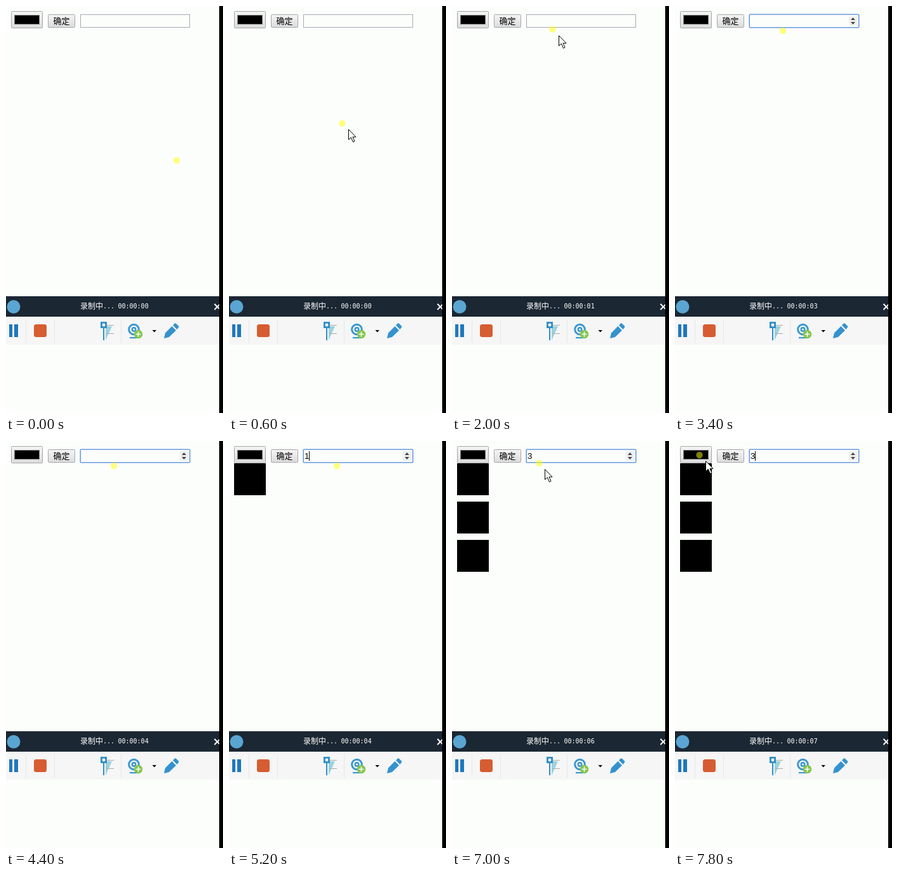
An HTML page for the animation above (8000 ms loop, 342 by 638 pixels).

```html
<!DOCTYPE html>
<html lang="zh">
<head>
<meta charset="utf-8">
<style>
  html, body { margin: 0; width: 100%; height: 100%; overflow: hidden; background: #fcfefc; }
  svg { display: block; position: absolute; left: 0; top: 0; }
  .label { font-family: "Noto Sans CJK SC", "Noto Sans CJK", sans-serif; }
  .mono { font: 10px "DejaVu Sans Mono", monospace; }
  .value { font: 13.33px "Liberation Sans", Arial, sans-serif; }
</style>
</head>
<body>
<svg width="342" height="638" viewBox="0 0 342 638">
  <defs>
    <linearGradient id="face" x2="0" y2="1">
      <stop offset="0" stop-color="#f5f5f5"/>
      <stop offset="1" stop-color="#dcdcdc"/>
    </linearGradient>
  </defs>
  <rect width="342" height="638" fill="#fcfefc"/>

  <!-- form -->
  <g stroke="#a6a6aa" fill="url(#face)">
    <rect x="8.5" y="8.5" width="49" height="26" rx="1"/>
    <rect x="66.5" y="13.5" width="42" height="20" rx="1"/>
  </g>
  <rect x="13.5" y="14.5" width="39" height="14" stroke="#777"/>
  <text class="label" x="74.5" y="28" font-size="13">确定</text>
  <rect x="117.5" y="13.5" width="172" height="20" fill="#fcfefc" stroke="#a9a9b0"/>
  <g id="focus">
    <rect x="117.25" y="13.25" width="172.5" height="20.5" rx="1" fill="#fcfefc" stroke="#6a9be0" stroke-width="1.6"/>
    <rect x="274" y="16" width="14" height="15" fill="#f0f0f0"/>
    <path d="M277 22L280.5 18L284 22ZM277 25H284L280.5 29Z" fill="#444"/>
  </g>
  <text id="value" class="value" x="119" y="28"></text>
  <rect id="caret" y="16" width="1" height="15"/>
  <g id="blocks">
    <rect x="8" y="35" width="50" height="50"/>
    <rect x="8" y="95" width="50" height="50"/>
    <rect x="8" y="155" width="50" height="50"/>
  </g>

  <!-- recorder bar -->
  <rect y="455" width="336" height="32" fill="#1b2733"/>
  <circle cx="12" cy="471.5" r="10.5" fill="#5aa5d2"/>
  <g fill="#fff">
    <text class="label" x="117" y="474.5" font-size="12">录制中</text>
    <text class="mono" x="153" y="474">...</text>
    <text id="clock" class="mono" x="176.5" y="474"></text>
  </g>
  <path d="M328.5 467L337.5 476M337.5 467L328.5 476" stroke="#fff" stroke-width="2"/>

  <!-- tools -->
  <rect y="487" width="336" height="44" fill="#f5f6f5"/>
  <path d="M31.5 492V528M76.5 492V528M181.5 492V528" stroke="#e6e8e8"/>
  <path d="M5 499H10V519H5ZM13 499H19V519H13Z" fill="#2077bd"/>
  <rect x="44" y="499" width="20" height="20" rx="3.5" fill="#d65c32"/>
  <g>
    <path d="M157 502H167L157 524Z" fill="#9cd2dc"/>
    <path d="M159 500.5H170M158 513.5H170" stroke="#a8acac"/>
    <path d="M149 495H159V505H155V524H153V505H149Z" fill="#338fc6"/>
    <circle cx="154" cy="500" r="2.4" fill="#fcfefc"/>
  </g>
  <g fill="none" stroke="#3c98d0">
    <circle cx="201.5" cy="507" r="7.8" stroke-width="3"/>
    <circle cx="201.5" cy="507" r="2.8" stroke-width="2.4"/>
    <path d="M195 520H208" stroke-width="2.2"/>
  </g>
  <circle cx="208.5" cy="514.5" r="6.7" fill="#83c54e"/>
  <path d="M204.5 514.5H212.5M208.5 510.5V518.5" stroke="#fff" stroke-width="1.6"/>
  <path d="M230.5 508H237L233.75 511.5Z"/>
  <path d="M249 521L251 512.5L261.5 502L268 508.5L257 519ZM263 500.5L266 497.5Q267 496.8 268 497.7L272 501.7Q272.8 502.7 272 503.7L269.5 507Z" fill="#3492cf"/>

  <!-- pointer -->
  <circle id="halo" r="5.2" fill="#ff0" fill-opacity=".5"/>
  <path id="arrow" d="M.5 .5V16.5L4.3 13L7.5 20.2L10 19L7 12.3H12Z" fill="#fff" stroke="#000"/>
  <rect x="336" width="6" height="638"/>
</svg>
<script>
const LOOP = 8000, STEP = 200, FOCUS = 2600, LEAVE = 7000;
const path = [[0, 269, 242], [1200, 88, 126], [2000, 158.5, 36.5], [2400, 170, 39],
  [6800, 170, 39], [7600, 38.5, 22], [LOOP, 38.5, 22]];
const ticks = [1400, 2600, 3400, 4400, 5400, 6400, 7400];
const edits = [4800, 5600, 6400];

const el = id => document.getElementById(id);
const [halo, arrow, focusRing, value, caret, clock] =
  ["halo", "arrow", "focus", "value", "caret", "clock"].map(el);
const blocks = [...el("blocks").children];
const show = (node, on) => node.setAttribute("visibility", on ? "visible" : "hidden");
const place = (node, x, y) => node.setAttribute("transform", `translate(${x} ${y})`);
const passed = (times, t) => times.filter(at => t >= at).length;

function pointerAt(t) {
  const i = path.findIndex(p => p[0] > t);
  const [t0, x0, y0] = path[i - 1], [t1, x1, y1] = path[i];
  const k = (t - t0) / (t1 - t0);
  return [x0 + (x1 - x0) * k, y0 + (y1 - y0) * k];
}

function draw(t) {
  const [x, y] = pointerAt(t);
  const overInput = t >= FOCUS && t < LEAVE;
  place(halo, x, y);
  place(arrow, Math.round(x + 9.25), Math.round(y + 9.25));
  show(arrow, t > 0 && !overInput);

  const count = passed(edits, t);
  const since = t - (count ? edits[count - 1] : FOCUS);
  show(focusRing, t >= FOCUS);
  value.textContent = count || "";
  caret.setAttribute("x", count ? 126 : 119);
  show(caret, t >= FOCUS && Math.floor(since / 500) % 2 === 0);
  blocks.forEach((b, i) => show(b, i < count));
  clock.textContent = "00:00:0" + passed(ticks, t);
}

const start = performance.now();
function frame() {
  const t = (performance.now() - start) % LOOP;
  draw(Math.floor(t / STEP) * STEP);
  requestAnimationFrame(frame);
}
frame();
</script>
</body>
</html>
```
